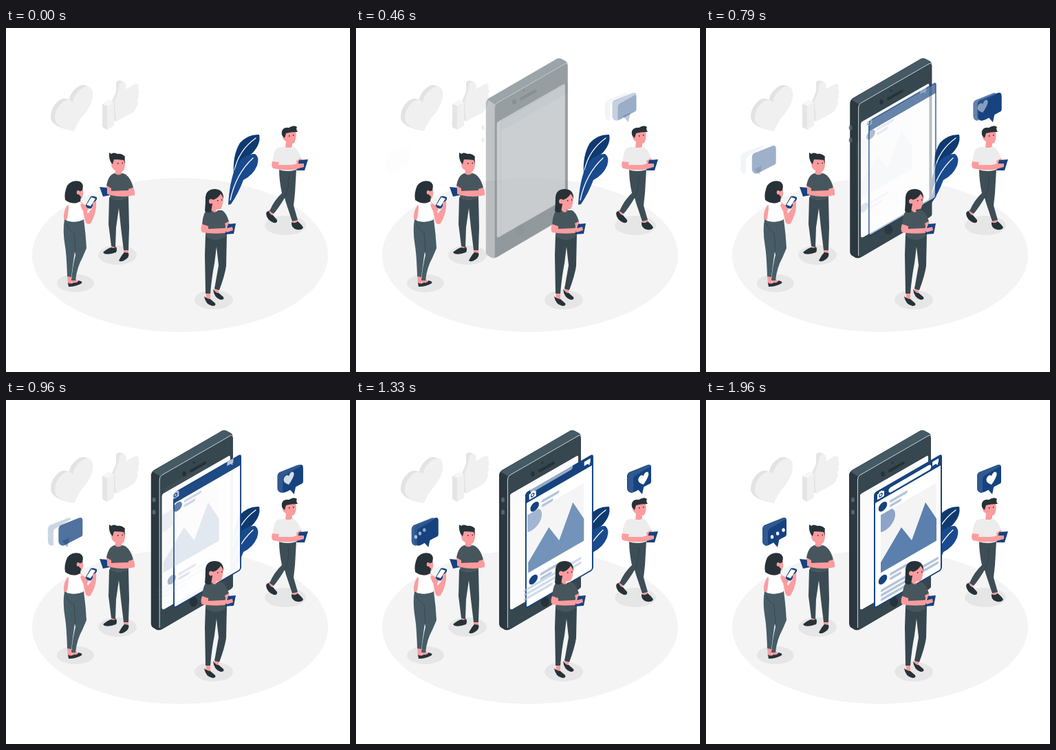
An HTML page that plays this animation: 500 by 500 pixels, repeating every 2000 ms.

```html
<!DOCTYPE html>
<html lang="en">
<head>
<meta charset="utf-8">
<title>Sharing scene</title>
<style>
html, body { margin: 0; width: 100%; height: 100%; overflow: hidden; background: #fff }
svg { display: block; width: 100vw; height: 100vh }
.iso { transform: translate(245px, 135.5px) skewY(-30deg) }
.blue { fill: #16437f }
.dark { fill: #263238 }
.skin { fill: #fb9c9e }
.line { fill: none; stroke: #b4c4db; stroke-width: 4; stroke-linecap: round }
.vein { fill: none; stroke: #fff; stroke-width: 1.3; stroke-linecap: round }
.fold { fill: none; stroke: #263238; stroke-width: .7; opacity: .6 }
</style>
</head>
<body>
<svg viewBox="0 0 500 500">
  <defs>
    <path id="heart" d="M99 150Q74 146 71 133Q70 119 82 108Q92 101 97 108Q100 93 113 86Q124 82 126 93Q128 110 110 130Q104 138 99 150Z"/>
    <path id="box" d="M0 16Q0 13 3 11L28 1Q35-2 35 4V24Q35 27 32 28L9 40Q5 42 2 39Q0 37 0 34Z"/>
    <path id="face" d="M8 21Q8 17 12 15L32 4Q35 2 35 6V24Q35 27 32 28L12 39Q8 41 8 37Z"/>
    <path id="tail" d="M14 34L25 29L22 43Z"/>
    <path id="side" d="M0 16Q0 13 3 11L28 1Q32-1 34 2L12 15Q8 17 8 21V40Q5 42 2 39Q0 37 0 34Z"/>
    <path id="screen" fill="#fbfbfc" d="M224 140Q224 137 226 136L321 81.500Q323 80.500 323 83.500V246Q323 249 321 250L227 304Q224 305 224 302Z"/>
    <clipPath id="card"><path d="M9 37H90V121H9Z"/></clipPath>
  </defs>

  <ellipse cx="253" cy="330" rx="215" ry="112" fill="#f4f4f4"/>
  <g fill="#e6e6e6">
    <ellipse cx="162" cy="330" rx="28" ry="14"/>
    <ellipse cx="101" cy="371" rx="27" ry="13"/>
    <ellipse cx="302" cy="395" rx="28" ry="14"/>
    <ellipse cx="406" cy="287" rx="30" ry="14"/>
  </g>

  <!-- grey icons -->
  <g fill="#e5e2e2">
    <use href="#heart" x="-6" y="-2"/><use href="#heart" x="-4" y="-1.4"/><use href="#heart" x="-2" y="-.7"/>
  </g>
  <use href="#heart" fill="#f0f0f0"/>
  <path fill="#e5e5e5" d="M154 106Q158 98 160 92V79Q162 75 168 77L172 79L166 92L160 108V136L157 134ZM140 110L147 113V148L140 144Z"/>
  <path fill="#f0f0f0" d="M158 106Q160 100 163 93L165 82Q167 77 172 79Q176 81 174 89L188 81Q195 82 192 88Q195 92 192 96Q194 101 191 104Q193 110 190 114Q188 120 184 123L160 136ZM147 113L157 108V142L147 148Z"/>
  <path fill="#f6f6f6" d="M140 110L150 104L157 108L147 113Z"/>

  <!-- leaves -->
  <path fill="#0f3a70" d="M331 213Q329 185 340 167Q352 154 368 155Q371 168 358 182Q340 192 331 213Z"/>
  <path class="vein" d="M332 207Q338 178 363 160"/>
  <path fill="#194a8e" d="M323 257Q325 222 334 202Q344 183 362 183Q369 188 365 200Q359 214 345 221Q338 240 327 256Z"/>
  <path class="vein" d="M326 250Q334 212 359 189"/>

  <!-- big phone -->
  <g data-start="0"><path fill="#2b383f" d="M208 110Q208 105 212 102L309 46Q314 42 320 46L324 48Q327 50 327 54V272L226 332Q219 337 213 332Q208 330 208 325Z"/></g>
  <g data-start="0">
    <path fill="#455a64" d="M210 104L309 46Q314 42 320 46L326 50L221 111Z"/>
    <path fill="#37474f" d="M220 116Q220 111 224 109L323 52Q327 50 327 54V270Q327 273 324 275L226 332Q220 335 220 330Z"/>
    <path fill="none" stroke="#cfd6d9" d="M220.4 331V116Q220.4 111 224 109L323 52Q327 50 327 54"/>
  </g>
  <g data-start="0"><use href="#screen"/></g>
  <g data-start="0"><use href="#screen"/></g>
  <g data-start="85" class="dark">
    <path stroke="#263238" stroke-width="4" stroke-linecap="round" d="M267 103L287 91.500"/>
    <ellipse cx="257" cy="107.500" rx="2.800" ry="3.800"/><circle cx="271" cy="91" r="1.600"/>
  </g>
  <g data-start="110" fill="#526770">
    <ellipse cx="213.500" cy="145" rx="2.500" ry="3.600"/><ellipse cx="213.500" cy="163" rx="2.500" ry="3.600"/>
  </g>
  <g data-start="180"><ellipse class="dark" cx="273" cy="293" rx="6" ry="7.500"/></g>

  <!-- app window -->
  <g data-start="185"><g class="iso"><rect width="97" height="167" rx="3" fill="#fff" stroke="#16437f" stroke-width="2"/></g></g>
  <g data-start="185"><g class="iso"><path class="blue" d="M0 3Q0 0 3 0H94Q97 0 97 3V15H0Z"/></g></g>
  <g data-start="300"><g class="iso">
    <path fill="#fff" d="M4 4H6L7 2H11L12 4H14V12H4ZM84 3H93V9H92V12L89 9H84Z"/>
    <circle class="blue" cx="9" cy="7.800" r="2.800"/><circle cx="9" cy="7.800" r="1.500" fill="#fff"/>
  </g></g>
  <g data-start="610"><g class="iso"><rect x="19" y="4" width="62" height="7.500" rx="3.700" fill="#fff"/></g></g>
  <g data-start="506"><g class="iso"><path fill="#f4f4f5" d="M9 37H90V121H9Z"/></g></g>
  <g data-start="526"><g class="iso"><circle cx="15" cy="48" r="15" fill="#8ba4c7" clip-path="url(#card)"/></g></g>
  <g data-start="506"><g class="iso"><path fill="#5b80ae" d="M9 121V106L39 72L54 99.700L74 56L90 89V121Z"/></g></g>
  <g data-start="297"><g class="iso"><circle class="blue" cx="12" cy="26.400" r="6.300"/></g></g>
  <g data-start="315"><g class="iso"><path class="line" d="M24 25H46M24 31.500H37"/></g></g>
  <g data-start="404"><g class="iso"><circle class="blue" cx="12" cy="132.400" r="6.300"/></g></g>
  <g data-start="412"><g class="iso"><path class="line" d="M24 131H46M24 137.500H37"/></g></g>
  <g data-start="590"><g class="iso"><path class="line" d="M10 147H90M10 153.500H90M10 160H48"/></g></g>

  <!-- speech bubbles -->
  <g data-start="25"><use href="#box" x="394" y="94" class="blue"/></g>
  <g data-start="25"><use href="#face" x="394" y="94" class="blue"/></g>
  <g data-start="10"><use href="#tail" x="394" y="94" class="blue"/></g>
  <g data-start="150"><use href="#side" x="394" y="94" fill="#2f5990"/></g>
  <g data-start="245"><path fill="#fff" transform="translate(415 115) skewY(-30)" d="M0 8Q-8 1-7.500-4Q-6-9-2-7Q0-6 0-4Q1-8 4-8Q8-7 7.500-2Q6 3 0 8Z"/></g>

  <g data-start="272"><use href="#box" x="82" y="171" class="blue"/></g>
  <g data-start="390"><use href="#tail" x="82" y="171" class="blue"/></g>
  <g data-start="460"><use href="#side" x="82" y="171" fill="#2f5990"/></g>
  <g fill="#fff">
    <ellipse data-start="580" cx="95.500" cy="199" rx="2.200" ry="2.700"/>
    <ellipse data-start="600" cx="103" cy="194" rx="2.200" ry="2.700"/>
    <ellipse data-start="620" cx="111" cy="189" rx="2.200" ry="2.700"/>
  </g>

  <!-- standing man -->
  <path class="skin" d="M153 314H159V322H153ZM171 320H178V330H171Z"/>
  <path class="dark" d="M141 326Q148 320 153 319Q158 321 160 318Q162 322 160 326Q150 330 143 328ZM164 338Q168 330 172 326L178 327Q180 333 173 337Q167 341 164 338Z"/>
  <path fill="#3b4b53" d="M150 246Q163 253 178 246L179 290L178 323L171 323L167 290L164 262L160 290L159 319L153 317L149 285Z"/>
  <path class="skin" d="M154 190H173Q174 203 170 208L168 209V214Q162 218 158 213L159 207Q154 205 153 199Z"/>
  <path class="dark" d="M150 181L153 183Q156 180 162 183Q168 182 173 187Q172 191 173 198L171 192Q164 191 157 191L155 198L153 196Q149 190 150 181Z"/>
  <path fill="#47565d" d="M146 229Q149 213 158 211Q163 216 169 211Q180 213 185 232L178 235L178 247Q163 253 151 247L152 236Z"/>
  <path class="skin" d="M185 232Q188 238 187 243Q170 247 152 243Q147 241 150 237L178 236L178 234ZM146 229L153 233L153 239L146 236Z"/>
  <path class="blue" d="M136 231L146 232Q149 237 151 243L141 245Z"/>
  <path class="skin" d="M147 233L153 237L152 243L147 241Z"/>
  <path class="dark" d="M162 196h1.400v1.800h-1.400zM168.500 195.500h1.400v1.800h-1.400z"/>

  <!-- woman seen from behind -->
  <path class="skin" d="M89 360H95V373H90ZM95 364H101L106 370L96 371Z"/>
  <path class="dark" d="M90 370Q93 373 99 370Q104 371 105 367Q112 368 110 371Q102 376 91 376Z"/>
  <path fill="#475c66" d="M85 278Q98 285 113 278Q116 300 117 320L111 334Q103 348 101 367L95 367Q97 345 101 330L100 325Q97 345 95 362L89 361Q88 330 86 318Q82 295 85 278Z"/>
  <path class="fold" d="M87 283Q92 295 98 297M99 297L101 326"/>
  <path class="skin" d="M90 257Q83 265 84 278L90 279Q90 268 94 262ZM96 248H107L109 257H94ZM104 234L111 233Q114 241 110 248L104 249ZM108 252Q115 257 119 270L125 262L127 256L131 260Q130 272 123 284Q117 287 115 280L112 266Z"/>
  <path fill="#fff" d="M91 256L95 253Q101 258 107 252L110 255Q113 264 112 279Q100 284 88 280Q91 270 91 256Z"/>
  <path class="dark" d="M86 250Q84 240 89 229Q96 220 107 223Q114 226 111 236L106 238Q105 243 109 245L108 252Q97 258 86 250Z"/>
  <ellipse class="skin" cx="105" cy="239" rx="2.300" ry="3"/>
  <path class="blue" d="M115 259L123 245Q126 243 132 246V249L124 262Q120 264 115 259Z"/>
  <path fill="#fff" d="M117 257L124 246L130 248L123 259Z"/>
  <path class="skin" d="M108 257Q112 253 117 260L120 264L116 268L111 265ZM126 254L131 251L131 262L126 263Z"/>

  <!-- woman in front -->
  <path class="skin" d="M291 382H297V394H291ZM303 376H309V387H303Z"/>
  <path class="dark" d="M288 390Q293 394 297 394L304 400Q306 404 300 404Q290 402 288 390ZM301 379Q305 386 309 385L316 391Q318 395 312 395Q302 392 301 379Z"/>
  <path fill="#37474f" d="M290 300L289 330L290 386L297 386Q299 362 303 342L306 318L309 345L303 379L310 381Q318 360 320 346L321 298Z"/>
  <path class="skin" d="M296 243Q304 236 315 241Q317 255 312 263L305 264L306 268Q300 272 296 265Z"/>
  <path fill="#47565d" d="M289 268Q293 264 299 265Q303 271 308 265L314 265Q320 268 324 281L319 285L320 302Q305 314 290 302L291 288L285 286Q286 274 289 268Z"/>
  <path class="skin" d="M285 285Q282 293 285 297Q300 300 318 298L330 296Q334 291 328 289L316 291L294 292L294 288ZM318 284L324 281L326 289L320 291Z"/>
  <path class="blue" d="M323 285L334 284L331 299L318 300Z"/>
  <path class="skin" d="M317 292L329 289L330 294L321 297Z"/>
  <path class="dark" d="M289 266Q290 255 290 246Q291 234 304 234Q317 235 316 249Q315 244 312 241Q308 248 300 250L300 256L298 267Q293 270 289 266ZM307 250h1.400v1.800h-1.400zM313 249h1.400v1.800h-1.400z"/>
  <ellipse class="skin" cx="298" cy="252" rx="3" ry="3.500"/>

  <!-- walking man -->
  <path class="skin" d="M382 264L389 268L386 275L381 273ZM416 277L423 276L425 285H417Z"/>
  <path class="dark" d="M379 267L382 266Q384 272 388 272L394 279Q395 284 389 283Q379 279 378 270ZM415 282Q420 285 424 281Q431 287 432 290Q430 294 423 293Q414 291 415 282Z"/>
  <path fill="#3e4e56" d="M397 205Q410 210 422 205L420 240L418 258L424 279L416 281L407 254L405 247Q396 262 389 270L383 266Q390 250 401 240Q397 222 397 205Z"/>
  <path class="fold" d="M411 214Q412 232 405 247"/>
  <path class="skin" d="M404 151L421 150Q423 160 419 167L416 168V174H406L407 165Q401 162 402 156Z"/>
  <path class="dark" d="M401 150Q403 144 411 145Q419 140 423 144Q421 147 424 151Q414 151 407 153L405 160L403 158Q400 156 401 150ZM411 156h1.400v1.800h-1.400zM417 155h1.400v1.800h-1.400z"/>
  <path fill="#ececec" d="M392 176Q398 172 406 173Q411 177 416 172Q424 174 429 189L422 194V206Q410 210 396 206L397 195L387 195Q389 182 392 176Z"/>
  <path class="skin" d="M387 194Q385 201 388 204Q405 208 424 205L434 203Q437 198 431 196L415 199L396 199L397 195ZM422 193L429 189L431 197L423 200Z"/>
  <path class="blue" d="M426 192L439 191L434 207L422 207Z"/>
  <path class="skin" d="M421 197L433 197L433 202L422 205Z"/>
</svg>
<script>
const LOOP = 2000, SLIDE = 42, LENGTH = 1000;
const parts = [...document.querySelectorAll('[data-start]')]
  .map(el => ({ el, start: +el.dataset.start }));

// The first third of the loop plays faster than the rest.
const clock = t => t < 670 ? 1.1 * (t - 95) : 632 + .72 * (t - 670);

const bezier = (s, a, b) => 3 * (1 - s) ** 2 * s * a + 3 * (1 - s) * s * s * b + s ** 3;

// cubic-bezier(.36, -.01, .5, 1.38): a slide with a small overshoot
function ease(x) {
  if (x <= 0) return 0;
  if (x >= 1) return 1;
  let lo = 0, hi = 1;
  for (let i = 0; i < 20; i++) {
    const mid = (lo + hi) / 2;
    if (bezier(mid, .36, .5) < x) lo = mid; else hi = mid;
  }
  return bezier(lo, -.01, 1.38);
}

function draw() {
  const now = clock(performance.now() % LOOP);
  for (const { el, start } of parts) {
    const p = ease((now - start) / LENGTH);
    el.setAttribute('transform', `translate(${(SLIDE * (p - 1)).toFixed(2)} 0)`);
    el.setAttribute('opacity', Math.min(1, p * p).toFixed(3));
  }
  requestAnimationFrame(draw);
}
draw();
</script>
</body>
</html>
```
